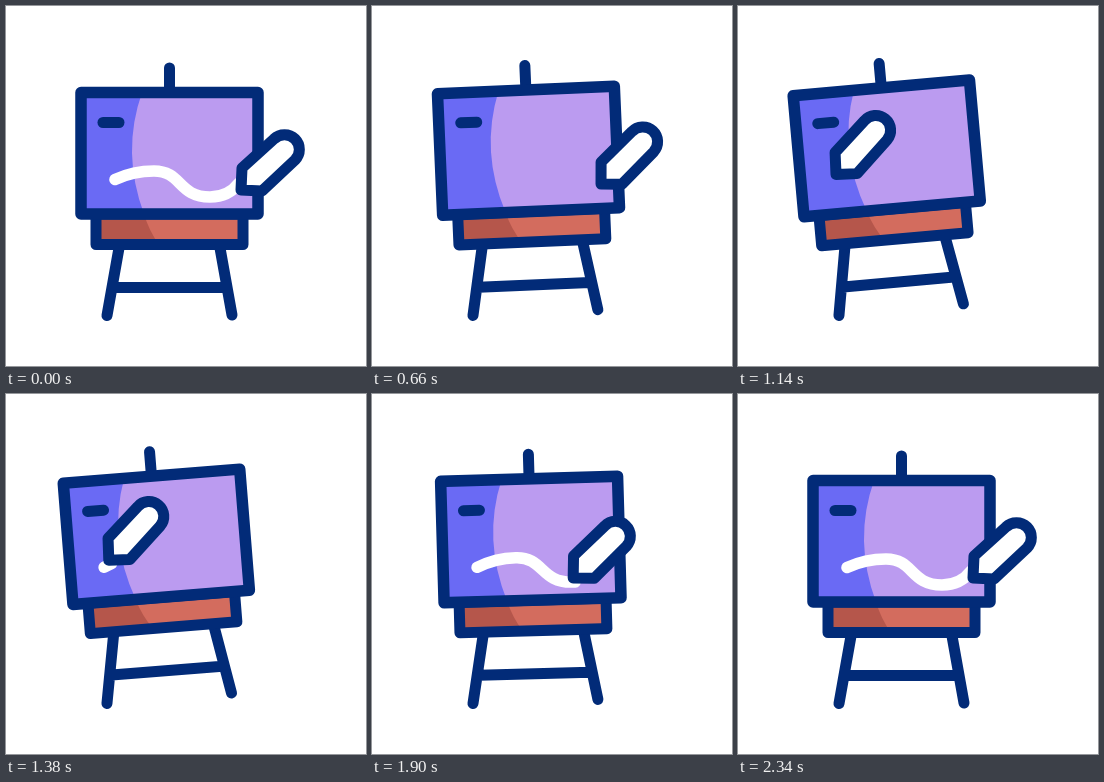
These frames come from a looping animation (360 px wide and 360 px high, 2400 ms). An HTML page:

```html
<!DOCTYPE html>
<html lang="en">
<head>
<meta charset="utf-8">
<title>Easel</title>
<style>
  html, body { margin: 0; height: 100%; overflow: hidden; background: #fff; }
  svg { display: block; width: 100%; height: 100%; }
</style>
</head>
<body>
<svg viewBox="0 0 360 360" fill="none" stroke-linecap="round" stroke-linejoin="round">
  <g id="easel" stroke="#022b78" stroke-width="11">
    <path d="M113 242L101 309.5M214 242L226 309M108 281.5H219M163.5 62V84"/>
    <path d="M90 208H237V238.5H90Z" fill="#d36c5e" stroke="none"/>
    <path d="M90 208H138Q143 225 153 238.5H90Z" fill="#b5564b" stroke="none"/>
    <path d="M90 208H237V238.5H90Z"/>
    <path d="M75 86.5H252V208H75Z" fill="#bb9bf0" stroke="none"/>
    <path d="M75 86.5H136Q115 146 138 208H75Z" fill="#6a6af4" stroke="none"/>
    <path d="M75 86.5H252V208H75Z" stroke-width="11.5"/>
    <path d="M97 116.5H113"/>
    <path id="line" pathLength="1" stroke="#fff" stroke-width="11.5" d="M109 173.5C123 167 138 165 148 165C176 165 172 191 204 191C217 191 227 185 233 177"/>
    <path id="pen" fill="#fff" d="M236 162L268 133A14.8 14.8 0 0 1 289 154L256 185L235 184Z"/>
  </g>
  <path id="back" d="M235 184Q168 133 107 171"/>
  <path id="draw" d="M107 171C135 153 153 163 168 173C186 182 204 193 235 184"/>
</svg>
<script>
const [easel, line, pen, back, draw] =
  ['easel', 'line', 'pen', 'back', 'draw'].map(id => document.getElementById(id));
const LOOP = 2400;
const tilt = [[0, 0], [220, 0], [1300, 6], [1640, 0], [1680, 0], [1990, 2.3], [2320, 0], [LOOP, 0]];

const progress = (t, a, b) => Math.min(1, Math.max(0, (t - a) / (b - a)));
const ease = u => u * u * (3 - 2 * u);
const along = (path, u) => path.getPointAtLength(u * path.getTotalLength());

function angleAt(t) {
  const i = tilt.findIndex(key => key[0] > t);
  const [t0, a0] = tilt[i - 1], [t1, a1] = tilt[i];
  return a0 + (a1 - a0) * progress(t, t0, t1);
}

function render(now) {
  const t = now % LOOP;
  const drawing = t >= 1236;
  const drawn = ease(progress(t, 1236, 2196));
  const erased = drawing ? 0 : ease(progress(t, 220, 640));
  const visible = drawing ? drawn : 1 - erased;
  const tip = drawing ? along(draw, drawn) : along(back, ease(progress(t, 640, 1200)));

  easel.setAttribute('transform', `rotate(${-angleAt(t)} 101 310)`);
  pen.setAttribute('transform', `translate(${tip.x - 235} ${tip.y - 184})`);
  line.setAttribute('visibility', visible > 0 ? 'visible' : 'hidden');
  line.setAttribute('stroke-dasharray', `${visible} 9`);
  line.setAttribute('stroke-dashoffset', -erased);
}

const start = performance.now();
function tick() {
  render(performance.now() - start);
  requestAnimationFrame(tick);
}
tick();
</script>
</body>
</html>
```
